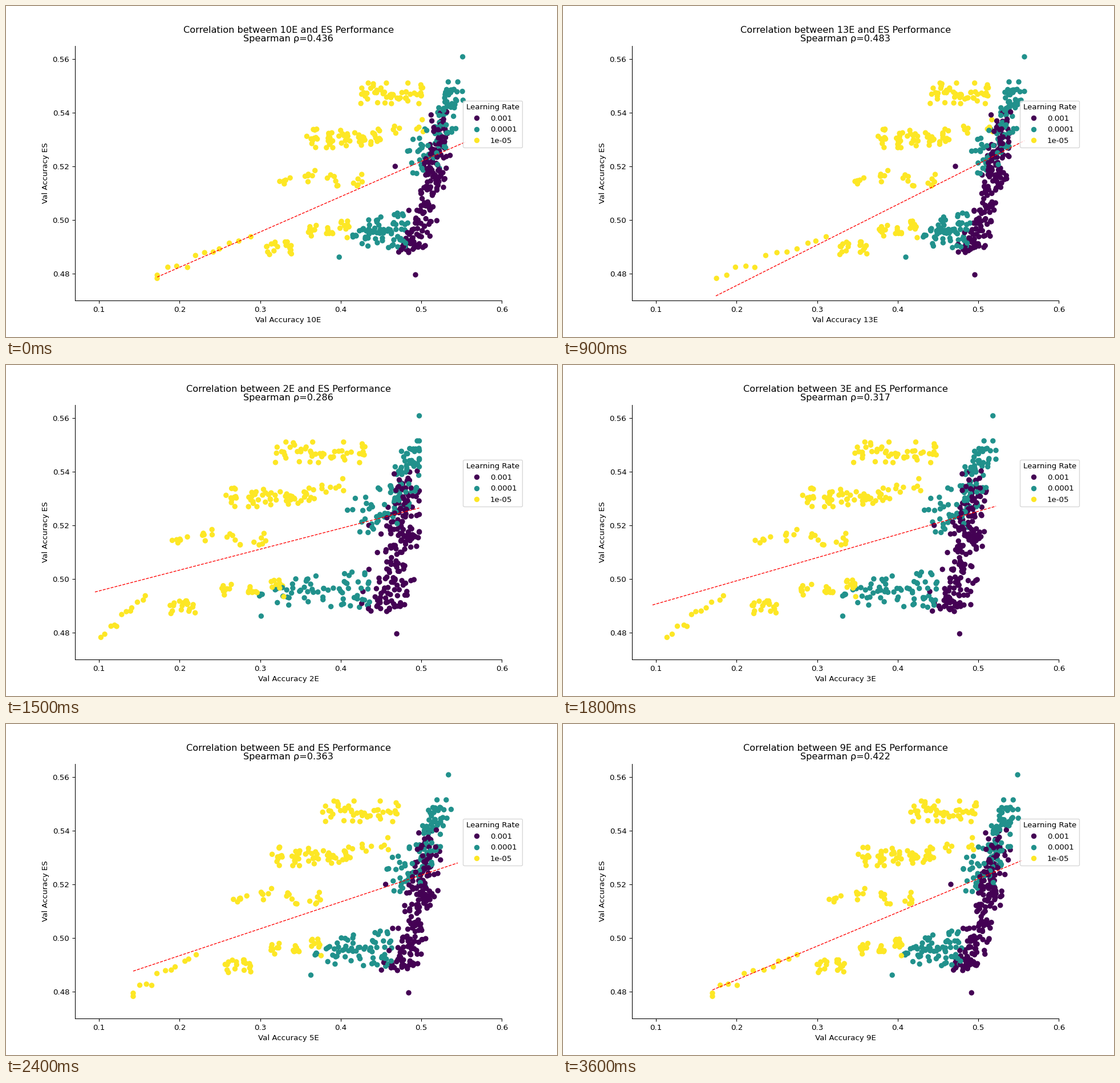
Recreate the animation shown at these times as a matplotlib script. Size 966 by 580 pixels, loop 3.9 s.

```python
import numpy as np
import matplotlib.pyplot as plt
from matplotlib.animation import FuncAnimation

W, H, DPI = 966, 580, 96.6
XLIM, YLIM = (0.07, 0.6), (0.47, 0.565)
PURPLE, TEAL, YELLOW = "#440154", "#21918c", "#fde725"
RATES = {"0.001": PURPLE, "0.0001": TEAL, "1e-05": YELLOW}
EPOCHS = [10, 11, 12, 13, *range(1, 10)]
PROGRESS = np.log(np.arange(1, 14)) / np.log(13)
rng = np.random.default_rng(12)

# Rows of clusters: y centre, y spread, clusters, points in each,
# then the x range of the centres at the first and last epoch (pixels).
ROWS = [
    (153, 10, 6, 8, (419, 577), (652, 741)),
    (214, 9, 2, 4, (500, 530), (702, 752)),
    (232, 9, 5, 11, (337, 475), (562, 668)),
    (299, 9, 4, 6, (225, 375), (520, 647)),
    (391, 10, 3, 9, (320, 420), (561, 611)),
    (426, 7, 2, 9, (225, 250), (492, 527)),
]
# Colour, y, x at the first and last epoch.
OUTLIERS = [
    (TEAL, 89, 649, 809), (TEAL, 133, 655, 782), (TEAL, 133, 668, 799),
    (TEAL, 440, 281, 601), (PURPLE, 471, 645, 722), (PURPLE, 281, 580, 688),
]

# Regression line and correlation at key epochs.
KEYS = [1, 3, 5, 7, 9, 10, 13]
LEFT = [155, 157, 223, 250, 262, 265, 268]
RIGHT = [690, 759, 792, 804, 805, 806, 809]
LEFT_Y = [375, 420.5, 433, 447, 466, 475, 508]
RHO = [0.255, 0.317, 0.363, 0.390, 0.422, 0.436, 0.483]


def to_x(px):
    return XLIM[0] + (np.asarray(px) / W - 0.125) / 0.775 * (XLIM[1] - XLIM[0])


def to_y(px):
    return YLIM[0] + (0.89 - np.asarray(px) / H) / 0.77 * (YLIM[1] - YLIM[0])


def jitter(n):
    return np.clip(rng.normal(size=n), -1.8, 1.8)


ys, paths, colors = [], [], []


def add(color, y, start, end, bend=1.0, noise=0.0):
    """Points at heights y that drift from start to end over the epochs."""
    for yi, a, b in np.broadcast(y, start, end):
        ys.append(yi)
        paths.append(a + (b - a) * PROGRESS**bend + rng.normal(0, noise, 13))
        colors.append(color)


def add_yellow():
    for y, spread, clusters, n, first, last in ROWS:
        for a, b in zip(np.linspace(*first, clusters), np.linspace(*last, clusters)):
            g = jitter(n)
            add(YELLOW, y + spread * jitter(n), a + 8 * g, b + 5 * g, noise=1.5)
    t = np.linspace(0, 1, 12)
    add(YELLOW, 477 - 72 * t + 4 * jitter(12), 150 + 60 * t,
        268 + 195 * t, bend=1.5, noise=2)


def add_teal():
    t, g, tail = rng.random(96), jitter(96), rng.exponential(20, 96)
    add(TEAL, 145 + 150 * t, 655 - 80 * t + (18 + 20 * t) * g - 1.5 * t * tail,
        794 - 48 * t + (9 + 8 * t) * g - 0.5 * t * tail, bend=0.55, noise=2)
    s = rng.beta(2.2, 1, 68)
    top = 362 + 45 * (1 - s) ** 2
    add(TEAL, top + (425 - top) * rng.random(68), 270 + 330 * s,
        612 + 98 * s, bend=0.8, noise=2)


def add_purple():
    t, g, tail = rng.beta(1.1, 0.9, 180), jitter(180), rng.exponential(20, 180)
    add(PURPLE, 184 + 248 * t, 648 + 18 * g - t * tail,
        771 - 55 * t**2 + 9 * g - 0.2 * t * tail, bend=0.6, noise=4)


add_yellow()
add_teal()
add_purple()
for color, y, start, end in OUTLIERS:
    add(color, y, start, end, bend=0.5)

order = rng.permutation(len(ys))
ys = to_y(ys)[order]
paths = np.array(paths)[order]
colors = [colors[i] for i in order]

plt.rcParams["font.family"] = "DejaVu Sans"
# The small margin keeps the pixel size from rounding down.
fig, ax = plt.subplots(figsize=((W + 0.01) / DPI, (H + 0.01) / DPI), dpi=DPI)
fig.subplots_adjust(left=0.125, right=0.9, bottom=0.11, top=0.88)
ax.set(xlim=XLIM, ylim=YLIM, ylabel="Val Accuracy ES",
       xticks=np.arange(1, 7) / 10, yticks=np.arange(48, 57, 2) / 100)
ax.spines[["top", "right"]].set_visible(False)

dots = ax.scatter(to_x(paths[:, 0]), ys, c=colors)
line, = ax.plot([], [], "r--", lw=1)
for label, color in RATES.items():
    ax.plot([], [], "o", color=color, label=label)
ax.legend(title="Learning Rate", loc="upper left", bbox_to_anchor=(0.9, 0.8))


def update(i):
    epoch = EPOCHS[i]
    left, right, left_y, rho = (np.interp(epoch, KEYS, v)
                                for v in (LEFT, RIGHT, LEFT_Y, RHO))
    right_y = 256 - 20 * PROGRESS[epoch - 1]
    x = np.clip(paths[:, epoch - 1], left, right)
    dots.set_offsets(np.column_stack([to_x(x), ys]))
    line.set_data(to_x([left, right]), to_y([left_y, right_y]))
    ax.set_xlabel(f"Val Accuracy {epoch}E")
    ax.set_title(f"Correlation between {epoch}E and ES Performance\n"
                 f"Spearman ρ={rho:.3f}", linespacing=1.0)
    return dots, line


anim = FuncAnimation(fig, update, frames=len(EPOCHS), interval=300, repeat=True)
plt.show()
```
